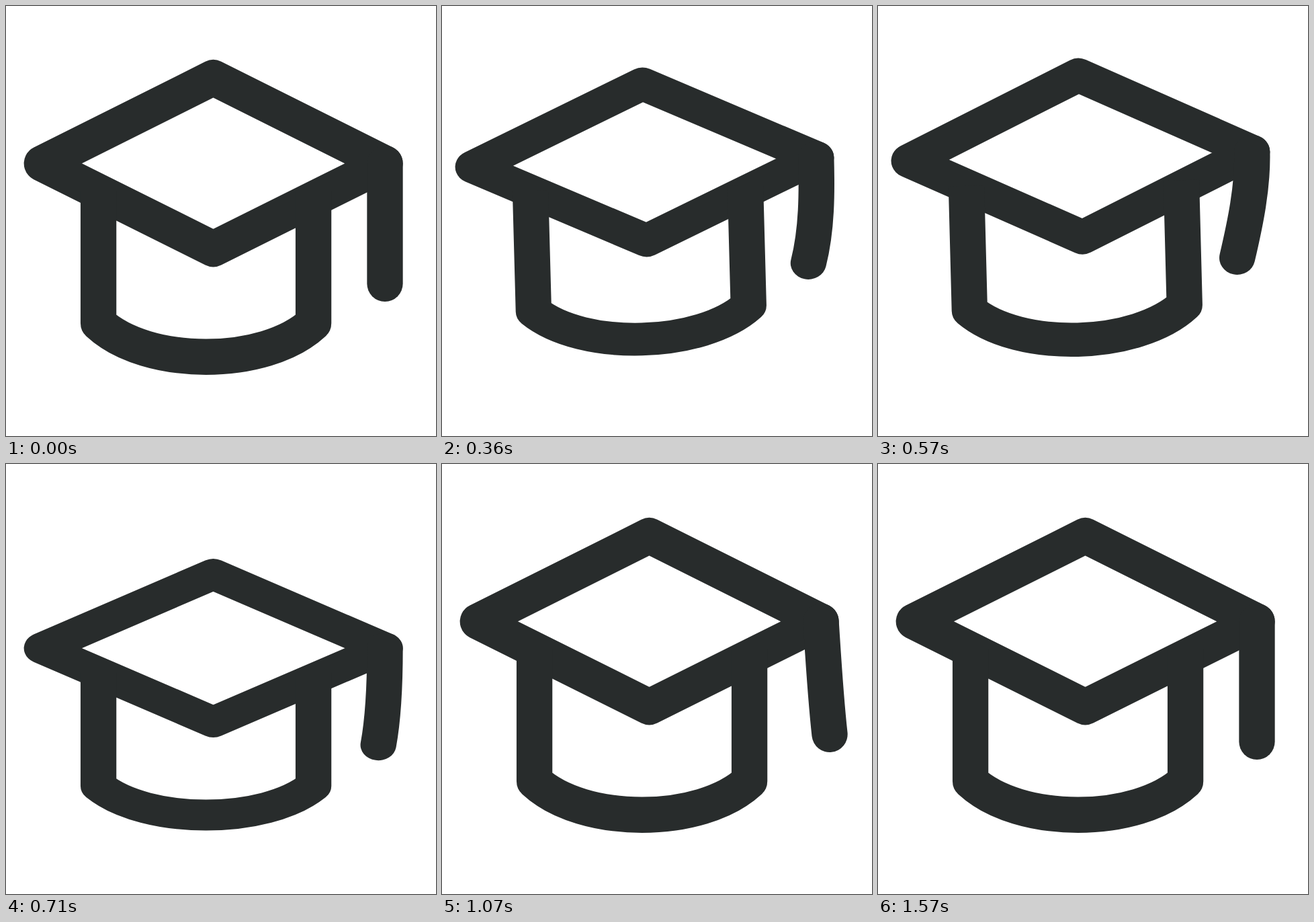
Write an HTML page that moves like this. It is 640x640 px and loops after 2.43 s.

```html
<!DOCTYPE html>
<html lang="en">
<head>
<meta charset="utf-8">
<title>Graduation cap</title>
<style>
html, body { margin: 0; width: 100%; height: 100%; overflow: hidden; background: #fff; }
svg { display: block; width: 100%; height: 100%; }
path { fill: none; stroke: #282c2c; stroke-width: 53.33; stroke-linejoin: round; }
#tassel { stroke-linecap: round; }
</style>
</head>
<body>
<svg viewBox="0 0 640 640">
  <g id="cap">
    <path d="M53.3 234.3 308.5 106.7 564 234.3 308.5 361.6Z"/>
    <path d="M137.6 276V472c72 67 248 67 320 0V276"/>
    <path id="tassel"/>
  </g>
</svg>
<script>
const LOOP = 2430, FPS = 14;
const CROUCH = 246, PEAK = 464, LAND = 679, REST = 857;      // cap, in ms
const BACK = 571, FRONT = 1265, HANG = 1571;                 // tassel, in ms
const PIVOT = { x: 308.5, y: 524.5 }, HOOK = { x: 564, y: 234.3 }, LENGTH = 179;
const cap = document.getElementById('cap');
const tassel = document.getElementById('tassel');

const smooth = u => u * u * (3 - 2 * u);
const settle = u => 1 - (1 - u) ** 2.15;

// Value at time t, eased from zero through moves of [start, end, value, ease]
function follow(t, from, ...moves) {
  let value = from;
  for (const [start, end, to, ease = smooth] of moves) {
    const u = Math.min(1, Math.max(0, (t - start) / (end - start)));
    value += (to - value) * ease(u);
  }
  return value;
}

function drawCap(t) {
  const squash = follow(t, 1, [0, CROUCH, 0.773], [CROUCH, PEAK, 1.047],
    [PEAK, LAND, 0.847], [LAND, REST, 1]);
  const rise = follow(t, 0, [CROUCH, PEAK, 1], [PEAK, LAND, 0]);
  cap.setAttribute('transform',
    `translate(${PIVOT.x} ${PIVOT.y - 52 * rise}) rotate(${-3 * rise}) ` +
    `scale(1 ${squash}) translate(${-PIVOT.x} ${-PIVOT.y})`);
}

function drawTassel(t) {
  const tip = follow(t, 0, [CROUCH, BACK, -26.2, settle], [BACK, FRONT, 15.7, settle],
    [FRONT, HANG, 0]);
  const bend = follow(t, 0, [300, BACK, -13], [BACK, 1000, 7, settle], [FRONT, HANG, 0]);
  const lift = follow(t, 0, [CROUCH, BACK, 13.2, settle], [BACK, REST, 11], [FRONT, HANG, 0]);
  const point = (dx, share) => `${HOOK.x + dx} ${HOOK.y + (LENGTH - lift) * share}`;
  tassel.setAttribute('d', `M${point(0, 0)}C` +
    [point(Math.max(0, bend / 2), 1 / 3), point(bend, 0.68), point(tip, 1)].join(' '));
}

// The picture advances in steps, each starting on a multiple of 10 ms
function stepTime(ms) {
  const start = k => Math.round(k * 100 / FPS) * 10;
  let k = Math.floor(ms * FPS / 1000) + 1;
  if (start(k) > ms) k--;
  return k * 1000 / FPS;
}

function draw(ms) {
  const t = stepTime(ms % LOOP);
  drawCap(t);
  drawTassel(t);
}

let origin;
function tick(now) {
  origin ??= now;
  draw(Math.max(0, now - origin));
  requestAnimationFrame(tick);
}
draw(0);
requestAnimationFrame(tick);
</script>
</body>
</html>
```
